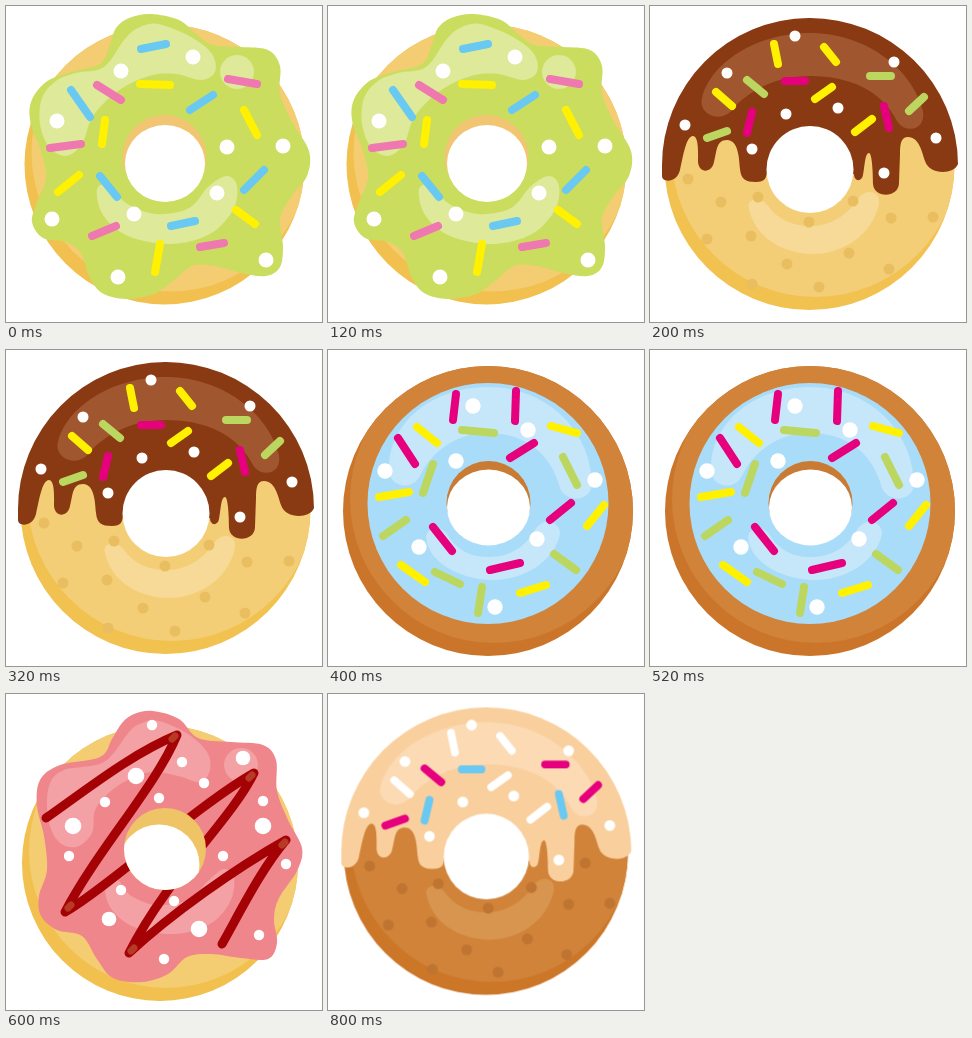
Animation, 316 px wide and 316 px high, one loop 0.92 s. Source, as an HTML page:

```html
<!DOCTYPE html>
<html lang="en">
<head>
<meta charset="utf-8">
<title>Donuts</title>
<style>
  html, body { margin: 0; width: 100%; height: 100%; overflow: hidden; background: #fff; }
  svg { display: block; width: 100vw; height: 100vh; }
  #stage > g { opacity: 0; }
</style>
</head>
<body>
<svg id="stage" viewBox="0 0 316 316"></svg>
<script>
const LOOP = 920, STEP = 200;
const YELLOW = '#fff100', MAGENTA = '#e6007e', BLUE = '#69c9f2', LIME = '#bcd75f', WHITE = '#fff';

const circle = (x, y, r, fill, extra = '') => `<circle cx="${x}" cy="${y}" r="${r}" fill="${fill}" ${extra}/>`;
const ellipse = (x, y, rx, ry, fill) => `<ellipse cx="${x}" cy="${y}" rx="${rx}" ry="${ry}" fill="${fill}"/>`;
const shape = (d, fill) => `<path d="${d}" fill="${fill}"/>`;
const lines = (d, color, width = 8) =>
  `<path d="${d}" fill="none" stroke="${color}" stroke-width="${width}" stroke-linecap="round" stroke-linejoin="round"/>`;
const pairs = text => text.split(' ').map(p => p.split(',').map(Number));
const dots = (text, r, fill) => pairs(text).map(([x, y]) => circle(x, y, r, fill)).join('');

// Closed smooth curve through the given points.
function blob(text, fill) {
  const p = pairs(text), n = p.length;
  let d = 'M' + p[0];
  for (let i = 0; i < n; i++) {
    const [a, b, c, e] = [-1, 0, 1, 2].map(k => p[(i + k + n) % n]);
    const c1 = [0, 1].map(k => b[k] + (c[k] - a[k]) / 6);
    const c2 = [0, 1].map(k => c[k] - (e[k] - b[k]) / 6);
    d += `C${c1} ${c2} ${c}`;
  }
  return shape(d, fill);
}

// Dough disc with a darker crescent along the lower edge.
function dough(id, x, y, r, light, dark) {
  return `<clipPath id="${id}">${circle(x, y, r, WHITE)}</clipPath>` + circle(x, y, r, dark) +
    circle(x + 6, y - 12, r - 1, light, `clip-path="url(#${id})"`);
}

function limeDonut() {
  return dough('d1', 158.5, 158.5, 140, '#f4cc72', '#f1c04e') +
    blob('110,22 123,12 145,8 173,14 190,28 207,39 235,41 262,44 274,60 274,88 286,116 303,145 301,170 285,191 274,213 277,240 274,261 260,270 235,267 208,260 186,260 167,275 148,288 120,293 96,287 83,270 75,247 60,236 37,232 26,216 31,196 40,172 35,145 25,119 25,96 40,76 65,66 94,58 104,38', '#cbdd5e') +
    blob('118,34 132,22 152,18 185,31 206,48 209,66 195,74 170,68 143,70 112,85 87,110 76,138 60,150 43,141 34,118 36,92 50,75 70,67 98,61', '#dee999') +
    circle(231, 66, 17, '#dee999') +
    blob('91,183 104,179 120,197 150,208 183,202 203,180 221,170 231,180 227,204 204,228 165,238 122,230 97,209', '#dee999') +
    circle(158.5, 151, 42, '#f1c571') + ellipse(159, 157.5, 40, 38.5, WHITE) +
    lines('M135 43L160 38M65 84L84 111M184 104L207 89M94 170L111 191M165 220L189 215M238 184L258 164', BLUE) +
    lines('M91 79L115 94M222 73L251 78M44 142L75 138M86 230L110 220M194 241L218 237', '#ee78af') +
    lines('M134 78L164 79M99 114L96 138M238 104L251 129M52 186L73 169M230 204L249 218M154 238L149 266', YELLOW) +
    dots('115,65 187,51 51,115 221,141 277,140 211,187 128,208 46,213 112,271 260,254', 7.5, WHITE);
}

function dripDonut(id, c) {
  return dough(id, 159.5, 159, 145, c.light, c.dark) +
    shape('M99 203C96 192 110 190 118 200C128 214 145 221 163 220C185 219 200 205 208 193C214 183 231 183 229 198C222 230 192 248 162 248C130 247 105 230 99 203Z', c.shine) +
    `<g transform="translate(${c.shift})">` +
    dots('38,173 71,196 108,191 57,233 101,230 159,216 137,258 203,195 241,212 283,211 199,247 239,263 169,281 102,278' + c.more, 5.5, c.spot) + '</g>' +
    shape('M12 160A148 147 0 0 1 308 158C304 169 279 169 275 155C272 146 269 131 258 131C251 131 250 138 250 148L249 177C249 192 224 193 223 178C223 166 222 147 219 147C215 147 215 158 213 169C212 176 204 176 204 168L117 163C117 172 115 176 106 176C95 176 91 173 90 163C89 154 89 134 77 134C66 134 67 145 64 156C62 167 49 168 48 156C48 148 49 130 43 130C36 130 33 151 30 164C27 177 12 177 12 170Z', c.icing) +
    shape('M52 92C60 58 105 27 160 27C215 27 262 62 273 105C276 125 255 128 247 115C232 85 200 70 160 70C125 70 98 85 82 104C70 118 48 108 52 92Z', c.gloss) +
    circle(160, 163.5, 43.5, WHITE) +
    lines('M124 38L128 58M174 41L186 56M66 86L82 100M165 93L182 81M205 126L222 113', c.mix[0]) +
    lines('M97 74L114 88M220 70L241 70M259 105L274 91M57 132L77 125', c.mix[1]) +
    lines('M135 75L155 75M102 106L97 127M234 100L239 122', c.mix[2]) +
    dots('145,30 77,67 244,56 188,102 136,108 102,143 35,119 286,132 234,167', 5.5, WHITE);
}

function blueDonut() {
  return dough('d3', 160, 161, 145, '#d08339', '#ca7529') +
    circle(160, 153.5, 120.5, '#a9dcf8') +
    shape('M61 120C60 72 105 37 160 37C218 37 263 80 264 134C263 152 238 153 232 138C223 104 198 83 160 83C128 83 104 101 92 126C84 141 62 138 61 120Z', '#c6e6fa') +
    shape('M98 187C100 175 115 175 121 187C130 201 145 208 163 207C185 206 198 195 207 180C214 167 232 170 232 184C226 212 196 230 164 230C130 229 100 212 98 187Z', '#c6e6fa') +
    circle(160.5, 153, 42, '#c97a33') + ellipse(160.5, 157.5, 41.5, 38, WHITE) +
    lines('M128 44L125 70M188 41L187 71M70 88L87 114M182 108L206 93M222 170L243 153M105 177L124 201M162 220L192 213', MAGENTA) +
    lines('M89 77L109 93M223 76L249 83M51 147L81 142M259 176L276 155M73 215L97 232M192 243L218 235', YELLOW) +
    lines('M134 80L166 83M235 107L249 135M105 114L95 143M55 186L78 170M107 222L132 234M226 204L248 220M154 237L150 263', LIME) +
    dots('145,56 200,80 57,121 128,111 267,130 209,189 91,197 167,257', 7.7, WHITE);
}

function pinkDonut() {
  return dough('d4', 154, 169, 138, '#f4cc72', '#f1c04e') +
    blob('116,29 128,20 147,17 173,25 192,44 225,48 257,51 270,66 271,97 282,126 296,154 291,177 273,204 268,225 271,249 262,265 235,264 205,260 181,263 162,280 136,288 107,284 91,265 76,242 51,236 35,222 33,202 41,176 38,142 31,112 34,86 54,71 94,63 106,45', '#ef868c') +
    blob('123,38 136,29 153,27 182,40 201,58 204,76 194,88 172,82 145,78 113,91 90,114 86,139 70,153 52,147 42,124 43,92 58,76 98,68', '#f3a1a4') +
    circle(235, 71, 17, '#f3a1a4') +
    blob('99,187 111,185 124,201 150,211 182,206 201,188 218,175 228,184 224,208 204,230 168,240 128,233 104,213', '#f3a1a4') +
    lines('M40 124C80 96 125 60 171 41C150 92 92 155 59 218C100 195 190 112 248 79C225 126 162 182 123 259C165 220 230 174 280 146C255 175 232 222 216 250', '#a50206', 9) +
    lines('M166 45L169 42M62 214L65 211M243 84L246 81M125 257L128 254M276 151L279 148', '#b63a24', 7) +
    `<clipPath id="hole">${circle(159, 155, 41, WHITE)}</clipPath>` +
    circle(159, 155, 41, '#efc466') + circle(153, 171, 40.5, WHITE, 'clip-path="url(#hole)"') +
    dots('130,82 67,132 257,132 193,235', 8.3, WHITE) + dots('237,64 103,225', 7.3, WHITE) +
    dots('146,31 176,68 198,89 99,108 153,104 63,162 257,107 217,162 280,170 115,196 168,207 253,241 158,265', 5.2, WHITE);
}

const chocolate = {
  light: '#f4ce76', dark: '#f1c250', shine: '#f7da98', spot: '#e9be60', icing: '#8a3a13', gloss: '#a0572f',
  mix: [YELLOW, LIME, MAGENTA], shift: '0 0', more: ''
};
const caramel = {
  light: '#d08339', dark: '#cc7628', shine: '#d8954f', spot: '#bf7431', icing: '#facf9e', gloss: '#fbdab4',
  mix: [WHITE, MAGENTA, BLUE], shift: '3 0', more: ' 258,170'
};

const donuts = [
  limeDonut(),
  dripDonut('d2', chocolate),
  blueDonut(),
  pinkDonut(),
  `<g transform="matrix(.98 0 0 .985 1.5 1.5)">${dripDonut('d5', caramel)}</g>`
];

const stage = document.getElementById('stage');
stage.innerHTML = donuts.map(d => `<g>${d}</g>`).join('');

[...stage.children].forEach((g, i) => {
  const from = i * STEP / LOOP, to = Math.min(1, (i + 1) * STEP / LOOP);
  const keys = [[0, 0], [from, 1], [to, 0], [1, 0]]
    .map(([offset, opacity]) => ({ offset, opacity, easing: 'step-end' }));
  g.animate(keys, { duration: LOOP, iterations: Infinity });
});
</script>
</body>
</html>
```
